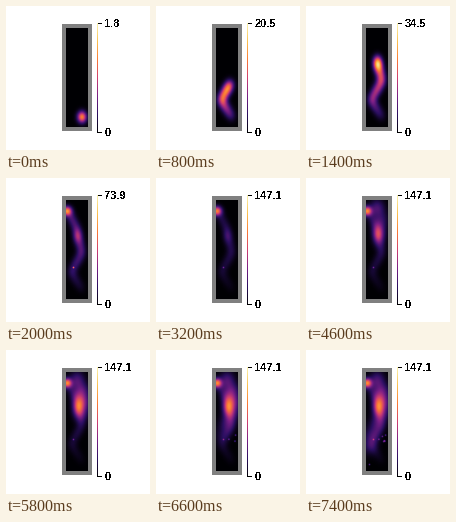
A matplotlib script for the animation above (8 s loop, 144 by 144 pixels).

```python
import numpy as np
import matplotlib.pyplot as plt
from matplotlib.animation import FuncAnimation
from matplotlib.colors import LinearSegmentedColormap
from matplotlib.patches import Rectangle

SIZE, DPI = 144, 72
STEP, FRAMES = 200, 40
LAST_CHANGE = 7400
LEFT, RIGHT, TOP, BOTTOM = 60, 82, 22, 121

heat = LinearSegmentedColormap.from_list(
    "heat", ["#000003", "#2c0f62", "#7a1f86", "#d03f70", "#fb7a35", "#fbc050", "#fcf3b0"])
rng = np.random.default_rng(4)
gx, gy = np.meshgrid(np.arange(LEFT, RIGHT) + 0.5, np.arange(TOP, BOTTOM) + 0.5)
layers = []


def ramp(t, start, end):
    return np.clip((t - start) / (end - start), 0, 1)


def stay(start, end, x, y, sx, sy, amount):
    """Heat that builds up around one place between two times."""
    shape = np.exp(-((gx - x) / sx) ** 2 / 2 - ((gy - y) / sy) ** 2 / 2)
    layers.append((start, end, amount * shape))


def spot(t, x, y):
    stay(t - 1, t, x, y, 0.6, 0.6, 35)


# Winding walk from the lower end to the upper left corner
for t in range(0, 1901, 50):
    y = 111 - 78 * t / 1900
    x = np.interp(y, [33, 50, 75, 94, 111], [62, 70.5, 76, 65, 76])
    stay(t - 1, t, x, y, 3.2, 4, 1.2 + 2.8 * ramp(t, 0, 700))

# Pauses on the way, in the corner and in the middle
stay(1000, 1400, 71.5, 58, 3, 5, 15)
stay(1600, 2400, 61, 33, 3.2, 3.2, 90)
stay(3600, 4600, 73, 54, 4.2, 8, 52)

# Slow wander back down
for k in range(7):
    start = 3800 + 500 * k
    stay(start, start + 600, 71 + 7 * np.sin(0.8 * k), 30 + 11 * k, 5, 6, 32 - 2 * k)

# Brief single visits
spot(1900, 67.5, 89.5)
for t in range(6200, 7201, 200):
    spot(t, rng.uniform(62, 80), rng.uniform(84, 98))
spot(LAST_CHANGE, 63.5, 114.5)


def field(t):
    return sum(ramp(t, start, end) * shape for start, end, shape in layers)


def scale_top(t):
    walking = 1.8 + 32.7 * ramp(t, 0, 1400)
    resting = 0.7 + 146.4 * ramp(t, 1600, 2400)
    return max(walking, resting)


plt.rcParams["text.antialiased"] = False
fig = plt.figure(figsize=(SIZE / DPI, SIZE / DPI), dpi=DPI, facecolor="white")
ax = fig.add_axes([0, 0, 1, 1])
ax.axis("off")


def box(x, y, w, h, color):
    ax.add_patch(Rectangle((x, y), w, h, fc=color, ec="none", antialiased=False))


def show(data, x0, x1, y0, y1):
    return ax.imshow(data, cmap=heat, vmin=0, vmax=1, extent=(x0, x1, y1, y0),
                     interpolation="nearest", aspect="auto", zorder=2)


def label(y, text):
    return ax.text(98.5, y + 4, text, family="Liberation Sans", weight="bold",
                   size=11 * 72 / DPI, va="baseline", color="black")


box(56, 18, 30, 107, "#808080")
image = show(np.zeros_like(gx), LEFT, RIGHT, TOP, BOTTOM)

# Thin colour scale with two ticks
show(np.linspace(1, 0, 110)[:, None], 91, 92, 17, 127)
for y in (17, 126):
    box(92, y, 4, 1, "black")
top_label = label(17, "")
label(126, "0")

ax.set_xlim(0, SIZE)
ax.set_ylim(SIZE, 0)


def update(i):
    t = min(i * STEP, LAST_CHANGE)
    top = scale_top(t)
    image.set_data(np.clip(field(t) / top, 0, 1))
    top_label.set_text(f"{top:.1f}")
    return image, top_label


anim = FuncAnimation(fig, update, frames=FRAMES, interval=STEP,
                     repeat=True, repeat_delay=0, blit=False)
plt.show()
```
